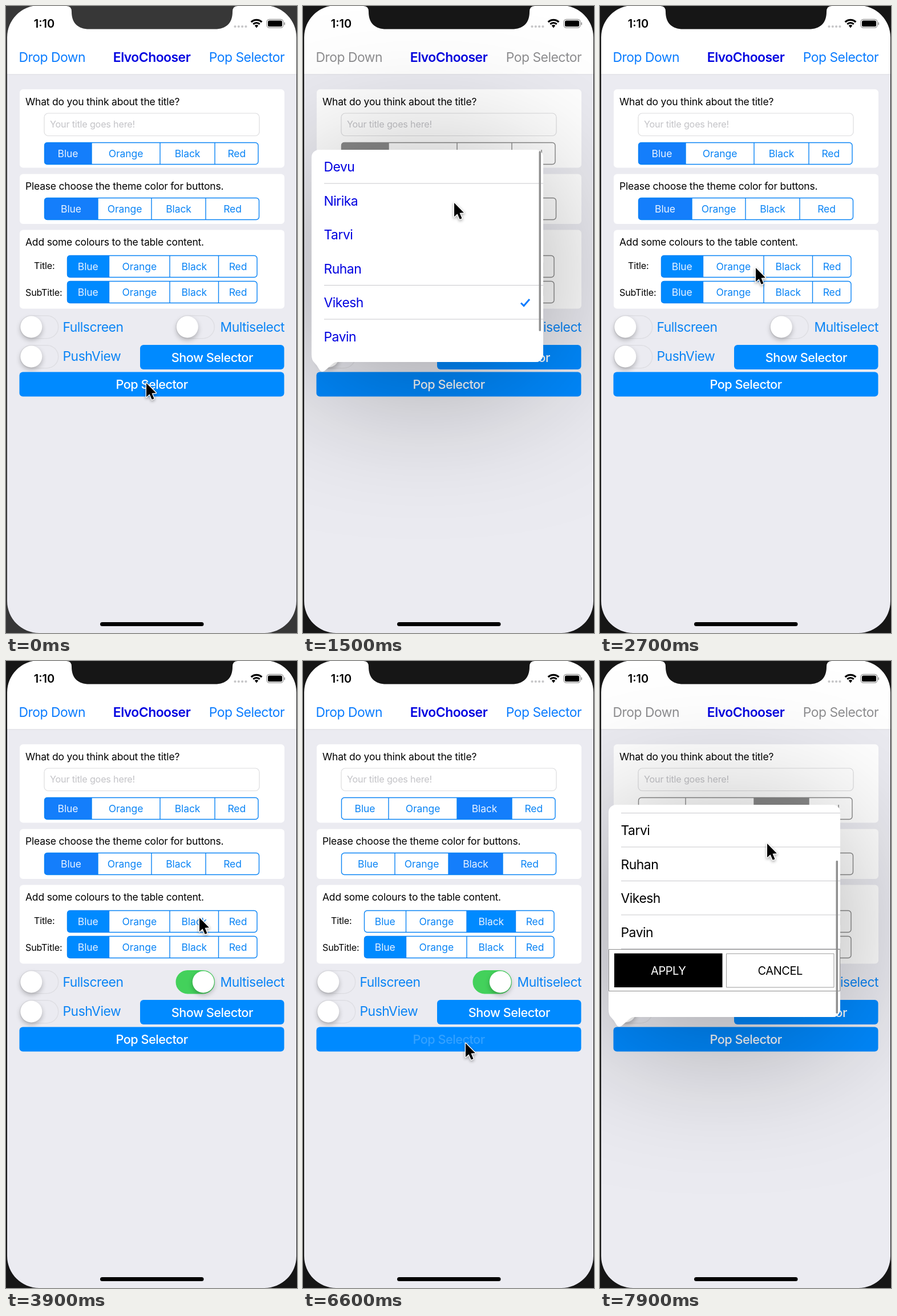
These frames come from a looping animation (510 px wide and 1099 px high, 8000 ms). An HTML page with a canvas:

```html
<!DOCTYPE html>
<html lang="en">
<head>
<meta charset="utf-8">
<title>Selector demo</title>
<style>
html, body { margin: 0; width: 100%; height: 100%; overflow: hidden; background: #161616; }
canvas { display: block; width: 510px; height: 1099px; }
</style>
</head>
<body>
<canvas id="stage" width="510" height="1099"></canvas>
<script>
const ctx = document.getElementById('stage').getContext('2d');
const LOOP = 8000, ROW = 59.5;
const POP = { x: 15, y: 252, w: 406, h: 372 };
const BLUE = '#0a84f5', SYSTEM = '#147efb', BUTTON = '#008aff', TITLE = '#0000e0';
const COLORS = ['Blue', 'Orange', 'Black', 'Red'];
const NAMES = ['Devu', 'Nirika', 'Tarvi', 'Ruhan', 'Vikesh', 'Pavin'];

// Cursor tip: time, x, y
const CURSOR = [
  [0, 246, 661], [400, 246, 661], [1100, 262, 420], [1500, 265, 345], [2100, 273, 459],
  [2750, 273, 459], [3200, 336, 565], [3450, 336, 565], [3900, 339, 450], [4250, 337, 450],
  [4600, 316, 358], [4900, 314, 355], [5300, 318, 274], [5500, 318, 262], [5800, 318, 262],
  [6400, 285, 670], [6850, 285, 670], [7350, 291, 462], [7480, 291, 462], [7900, 293, 320]
];

const clamp = v => Math.max(0, Math.min(1, v));
const smooth = v => { v = clamp(v); return v * v * (3 - 2 * v); };
const ramp = (t, from, to) => smooth((t - from) / (to - from));

function mix(from, to, amount) {
  const channel = (hex, i) => parseInt(hex.slice(i, i + 2), 16);
  const part = i => Math.round(channel(from, i) + (channel(to, i) - channel(from, i)) * amount);
  return `rgb(${part(1)},${part(3)},${part(5)})`;
}

function cursorAt(t) {
  const next = CURSOR.findIndex(k => k[0] > t);
  if (next < 0) return CURSOR[CURSOR.length - 1].slice(1);
  const [t0, x0, y0] = CURSOR[next - 1], [t1, x1, y1] = CURSOR[next];
  const k = ramp(t, t0, t1);
  return [x0 + (x1 - x0) * k, y0 + (y1 - y0) * k];
}

function text(str, x, y, size, color, { align = 'left', weight = 400, gap = -0.2 } = {}) {
  ctx.font = `${weight} ${size}px Inter, sans-serif`;
  ctx.letterSpacing = gap + 'px';
  ctx.textAlign = align;
  ctx.fillStyle = color;
  ctx.fillText(str, x, y);
}

const body = (str, x, y, color, options) => text(str, x, y, 22.9, color, { gap: -0.5, ...options });

function box(x, y, w, h, r, fill, stroke, line = 1.4) {
  ctx.beginPath();
  ctx.roundRect(x, y, w, h, r);
  if (fill) { ctx.fillStyle = fill; ctx.fill(); }
  if (stroke) { ctx.strokeStyle = stroke; ctx.lineWidth = line; ctx.stroke(); }
}

function line(x1, y1, x2, y2, color, width = 1) {
  ctx.beginPath();
  ctx.moveTo(x1, y1);
  ctx.lineTo(x2, y2);
  ctx.strokeStyle = color;
  ctx.lineWidth = width;
  ctx.stroke();
}

function segments(edges, y, h, selected, fill, tint) {
  const left = edges[0], width = edges[4] - left;
  ctx.save();
  ctx.beginPath();
  ctx.roundRect(left, y, width, h, 5);
  ctx.clip();
  box(left, y, width, h, 0, '#fff');
  box(edges[selected], y, edges[selected + 1] - edges[selected], h, 0, fill);
  ctx.restore();
  box(left + .5, y + .5, width - 1, h - 1, 5, null, tint);
  edges.slice(1, 4).forEach(x => line(x, y, x, y + h, tint, 1.4));
  COLORS.forEach((name, i) => text(name, (edges[i] + edges[i + 1]) / 2, y + h / 2 + 6.3, 17.5,
    i === selected ? '#e9f3ff' : tint, { align: 'center', gap: -0.1 }));
}

function toggle(x, y, on) {
  box(x + .7, y + .7, 67, 40, 20, mix('#ebebf1', '#43d15b', on), mix('#dedee3', '#43d15b', on));
  ctx.save();
  ctx.shadowColor = 'rgba(0,0,0,.25)';
  ctx.shadowBlur = 8;
  ctx.shadowOffsetY = 4;
  ctx.beginPath();
  ctx.arc(x + 20.3 + 28 * on, y + 20.5, 19, 0, 7);
  ctx.fillStyle = '#fff';
  ctx.fill();
  ctx.restore();
}

function button(label, x, y, w, alpha = 1) {
  box(x, y, w, 43, 6, BUTTON);
  text(label, x + w / 2, y + 29.5, 21.7, `rgba(255,255,255,${alpha})`,
    { align: 'center', weight: 500, gap: -0.5 });
}

function statusBar() {
  text('1:10', 67, 38, 20, '#000', { align: 'center', weight: 600, gap: 0 });
  ctx.fillStyle = '#c6c6c8';
  for (let i = 0; i < 4; i++) {
    ctx.beginPath();
    ctx.arc(401.5 + i * 6.3, 36, 2.1, 0, 7);
    ctx.fill();
  }
  ctx.strokeStyle = '#000';
  ctx.lineWidth = 3.2;
  for (const r of [13.2, 8]) {
    ctx.beginPath();
    ctx.arc(439, 37.5, r, -Math.PI * .75, -Math.PI * .25);
    ctx.stroke();
  }
  ctx.beginPath();
  ctx.moveTo(439, 38.5);
  ctx.arc(439, 37.5, 4.6, -Math.PI * .75, -Math.PI * .25);
  ctx.fillStyle = '#000';
  ctx.fill();
  box(457, 23.5, 29, 14.5, 4.5, null, '#999', 1.3);
  box(459, 25.5, 25, 10.5, 2.6, '#000');
  box(487.3, 28.5, 1.8, 5, 1, '#999');
}

function page(t, dim) {
  ctx.fillStyle = '#ebebf1';
  ctx.fillRect(0, 0, 510, 1099);
  ctx.fillStyle = '#fff';
  ctx.fillRect(0, 0, 510, 119.5);
  line(0, 120, 510, 120, '#dddde2');
  statusBar();

  const nav = mix('#0a7cff', '#8e8e90', dim);
  body('Drop Down', 22.5, 98, nav);
  body('ElvoChooser', 255.5, 98, TITLE, { align: 'center', weight: 600 });
  body('Pop Selector', 488, 98, nav, { align: 'right' });

  for (const [y, h] of [[146, 137.5], [294.5, 87.5], [392.5, 138]]) box(24, y, 464, h, 6, '#fff');
  text('What do you think about the title?', 34, 173.5, 17.5, '#000');
  text('Please choose the theme color for buttons.', 34, 322, 17.5, '#000');
  text('Add some colours to the table content.', 34, 420, 17.5, '#000');
  box(67, 188, 377, 39.5, 7, '#fff', '#dcdcde', 1.2);
  text('Your title goes here!', 77, 212.5, 16.2, '#c3c3c7');

  const tint = mix(BLUE, '#8a8a8a', dim);
  const sysFill = mix(SYSTEM, '#8a8a8a', dim), fill = mix(BUTTON, '#8a8a8a', dim);
  segments([67, 150, 270, 366, 442.5], 239, 39, t > 5550 ? 2 : 0, sysFill, tint);
  segments([67, 161, 255, 350, 444], 336, 39, t > 4750 ? 2 : 0, sysFill, tint);
  const table = [107, 180.5, 287, 372.5, 440.5];
  segments(table, 437, 39, t > 4120 ? 2 : 0, fill, tint);
  segments(table, 482, 39, 0, fill, tint);
  text('Title:', 49, 460.5, 16.2, '#000');
  text('SubTitle:', 34, 507.5, 16.2, '#000');

  toggle(24, 542, 0);
  toggle(24, 594, 0);
  toggle(297.5, 542, ramp(t, 3300, 3550));
  body('Fullscreen', 99.5, 571, BLUE);
  body('Multiselect', 488, 571, BLUE, { align: 'right' });
  body('PushView', 99.5, 622, BLUE);

  const press = (from, to) => t < from ? 0 : 1 - ramp(t, to, to + 200);
  button('Show Selector', 235, 594, 252.5);
  button('Pop Selector', 23.5, 641.5, 464, 1 - .8 * Math.max(press(180, 350), press(6550, 6720)));
}

function popoverPath() {
  const { x, y, w, h } = POP, right = x + w, bottom = y + h;
  ctx.beginPath();
  ctx.moveTo(x + 14, y);
  ctx.arcTo(right, y, right, bottom, 13);
  ctx.arcTo(right, bottom, x, bottom, 13);
  ctx.lineTo(60, bottom);
  ctx.quadraticCurveTo(55, bottom, 51, bottom + 4);
  ctx.lineTo(39, bottom + 14.5);
  ctx.quadraticCurveTo(33, bottom + 20, 28.5, bottom + 13);
  ctx.quadraticCurveTo(25, bottom + 6, 19, bottom);
  ctx.quadraticCurveTo(x, bottom - 4, x, bottom - 14);
  ctx.arcTo(x, y, x + 14, y, 13);
  ctx.closePath();
}

function footer(top) {
  box(15.5, top + .5, 405, 73, 0, '#fff', '#8c8c8c', 1);
  box(25, top + 7.5, 189.5, 59.5, 0, '#000');
  box(221.5, top + 8, 188.5, 59, 0, '#fff', '#999', 1);
  text('APPLY', 119.7, top + 45, 20, '#fff', { align: 'center', gap: -0.45 });
  text('CANCEL', 315.7, top + 45, 20, '#000', { align: 'center', gap: -0.45 });
}

function popover(t, shown) {
  const multi = t > 4000;
  const scroll = multi ? 104 * ramp(t, 7480, 7900) : 0;
  const checked = t > 2230 ? 3 : 4;
  ctx.save();
  ctx.globalAlpha = shown;
  ctx.save();
  ctx.shadowColor = 'rgba(0,0,0,.35)';
  ctx.shadowBlur = 260;
  ctx.shadowOffsetY = 30;
  popoverPath();
  ctx.fillStyle = '#fff';
  ctx.fill();
  ctx.restore();

  popoverPath();
  ctx.clip();
  NAMES.forEach((name, i) => {
    const top = POP.y + i * ROW - scroll;
    body(name, 36.5, top + 38, multi ? '#000' : TITLE);
    const hidden = !multi && (i === 1 || i === 2 || i === 5);
    if (!hidden) line(37, top + ROW - .5, 421, top + ROW - .5, '#c8c8cc');
    if (!multi && i === checked) {
      ctx.beginPath();
      ctx.moveTo(382, top + 30.5);
      ctx.lineTo(387, top + 35.5);
      ctx.lineTo(397, top + 24);
      ctx.strokeStyle = '#0a7cff';
      ctx.lineWidth = 3;
      ctx.stroke();
    }
  });
  if (multi) footer(POP.y + 6 * ROW - scroll);

  const barTop = 254 + scroll * .92;
  box(413.5, barTop, 3.5, Math.min(316, 618 - barTop), 2, '#8f8f8f');
  ctx.restore();
}

function bezel(t) {
  ctx.fillStyle = t < 200 ? '#373737' : '#161616';
  ctx.beginPath();
  ctx.rect(0, 0, 510, 1099);
  ctx.roundRect(2, -1, 507, 1100, 56);
  ctx.fill('evenodd');
  ctx.beginPath();
  ctx.moveTo(106, 0);
  ctx.quadraticCurveTo(115, 0, 115, 10);
  ctx.bezierCurveTo(115, 30, 126, 40.5, 146, 40.5);
  ctx.lineTo(366, 40.5);
  ctx.bezierCurveTo(386, 40.5, 397, 30, 397, 10);
  ctx.quadraticCurveTo(397, 0, 406, 0);
  ctx.fill();
  box(165, 1080, 181.5, 7, 3.5, '#000');
}

function pointer(x, y) {
  const shape = [[0, 0], [0, 27], [6.2, 21.3], [10.8, 32], [15, 30.2], [10.6, 19.8], [18.8, 19.2]];
  ctx.save();
  ctx.translate(x, y);
  ctx.scale(.9, .9);
  ctx.beginPath();
  shape.forEach(([px, py]) => ctx.lineTo(px, py));
  ctx.closePath();
  ctx.lineJoin = 'round';
  ctx.strokeStyle = '#fff';
  ctx.lineWidth = 3;
  ctx.shadowColor = 'rgba(0,0,0,.4)';
  ctx.shadowBlur = 5;
  ctx.shadowOffsetY = 2;
  ctx.stroke();
  ctx.shadowColor = 'transparent';
  ctx.fillStyle = '#000';
  ctx.fill();
  ctx.restore();
}

function draw(t) {
  const shown = t < 4000
    ? ramp(t, 450, 750) * (1 - ramp(t, 2300, 2600))
    : ramp(t, 6800, 7100);
  page(t, shown);
  if (shown > 0) popover(t, shown);
  bezel(t);
  pointer(...cursorAt(t));
}

const start = performance.now();
function tick() {
  draw((performance.now() - start) % LOOP);
  requestAnimationFrame(tick);
}
tick();
</script>
</body>
</html>
```
